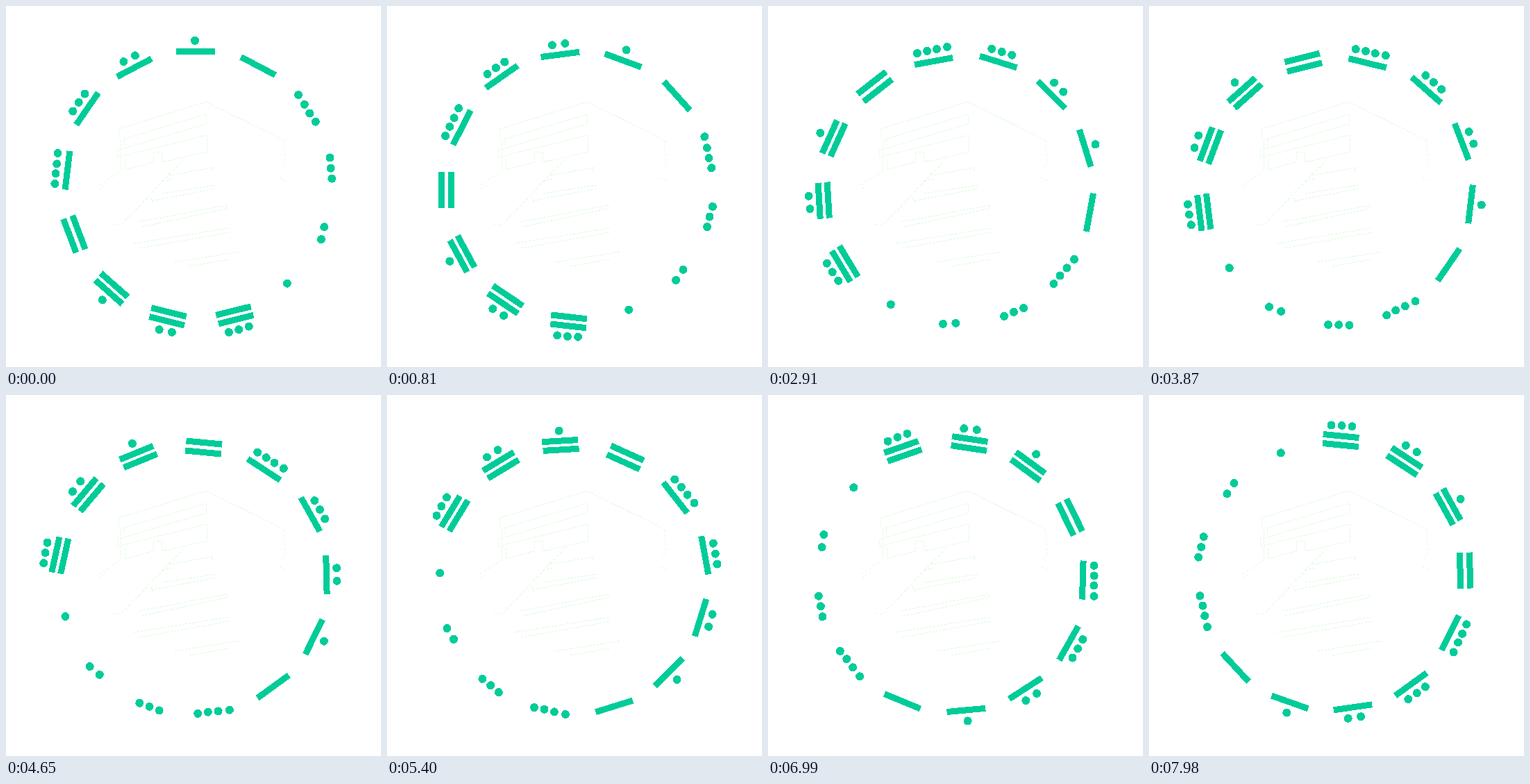
These frames come from a looping animation (540x520 px, 8000 ms). An HTML page:

```html
<!DOCTYPE html>
<html lang="en">
<head>
<meta charset="utf-8">
<title>Numeral wheel</title>
<style>
html, body { margin: 0; width: 100%; height: 100%; overflow: hidden; background: #fff; }
svg { display: block; width: 540px; height: 520px; }
#wheel { fill: #00cc99; shape-rendering: crispEdges; }
#house { fill: none; stroke-width: 1; shape-rendering: crispEdges; }
</style>
</head>
<body>
<svg viewBox="0 0 540 520">
  <g id="house">
    <path stroke="#e6fbe6" stroke-dasharray="5 1" d="M163 177L288 138L399 193M163 177L162 191M168 192L288 156V170L160 208V218L289 186L290 210L226 225M165 192V236M170 192V201M171 220V236L212 225V210H224L225 224"/>
    <path stroke="#e6fbe6" stroke-dasharray="4 3" d="M399 193L401 198L399 207L402 212L401 230L396 235M394 247L402 252M134 258L165 238M135 264L142 258M154 314L165 316L260 217M186 295L240 236M226 224L240 222"/>
    <path stroke="#dcf9dc" stroke-dasharray="3 2" d="M235 244L297 233V238M225 252L240 249M210 281L301 263M225 270L302 258M208 276L212 284M192 311L318 287V292L195 318M184 342L320 320M193 349L322 326M243 369L336 354M264 375L320 365"/>
  </g>
  <g id="wheel"></g>
</svg>
<script>
const CX = 270.2, CY = 260, SLOT = 360 / 13;
const LOOP = 8000, STEP = 30, TURN = 0.75;

// One entry per numeral 1-13: points relative to the hub, numeral upright at the top.
const numerals = [
  { dots: [[-8.2, -193.8]] },
  { dots: [[-12.2, -196.5], [6, -198.7]] },
  { dots: [[-17.6, -199.9], [-2.4, -199.2], [12.7, -199.1]] },
  { dots: [[-23, -199.1], [-6.6, -198.5], [8.2, -197.5], [23, -197.6]] },
  { bars: [[1.7, -196.8]] },
  { bars: [[2.6, -194.5]], dots: [[1.8, -210.2]] },
  { bars: [[4, -191.2]], dots: [[-5.6, -206.1], [13, -206.1]] },
  { bars: [[5.1, -189.7]], dots: [[-9.5, -204.7], [5.6, -205], [20.8, -204.8]] },
  { bars: [[1.2, -183.2]], dots: [[-20.1, -198.8], [-5.4, -199.4], [8.6, -199.5], [24, -200]] },
  { bars: [[-3.2, -192], [-3.2, -178]] },
  { bars: [[-9.4, -194.8], [-8.6, -182]], dots: [[-9.9, -209.4]] },
  { bars: [[-9, -197.4], [-8.6, -184.3]], dots: [[-19.8, -211.2], [-1.2, -212]] },
  { bars: [[-13.4, -200.6], [-12.8, -187.6]], dots: [[-29, -214.7], [-13.9, -215.7], [1, -215.9]] }
];

const wheel = document.getElementById("wheel");

function add(parent, tag, attrs) {
  const el = document.createElementNS("http://www.w3.org/2000/svg", tag);
  for (const k in attrs) el.setAttribute(k, attrs[k]);
  return parent.appendChild(el);
}

numerals.forEach(({ bars = [], dots = [] }, i) => {
  const g = add(wheel, "g", { transform: `rotate(${(5 - i) * SLOT})` });
  const len = bars.length > 1 ? 52 : 56;
  for (const [x, y] of bars)
    add(g, "rect", { x: x - len / 2, y: y - 4.5, width: len, height: 9 });
  for (const [cx, cy] of dots) add(g, "circle", { cx, cy, r: 6 });
});

function draw(ms) {
  const angle = Math.floor((ms % LOOP) / STEP) * TURN;
  wheel.setAttribute("transform", `translate(${CX} ${CY}) rotate(${angle})`);
}

const start = performance.now();
function tick() {
  draw(performance.now() - start);
  requestAnimationFrame(tick);
}
draw(0);
requestAnimationFrame(tick);
</script>
</body>
</html>
```
